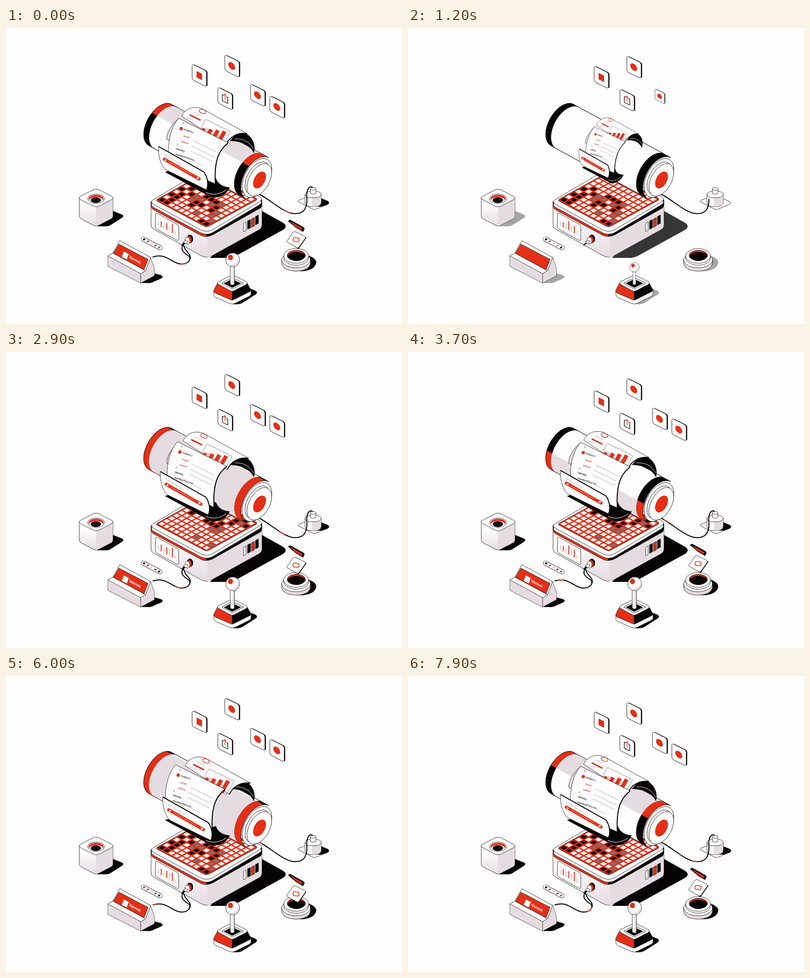
An HTML page for the animation above (8 s loop, 800 by 600 pixels).

```html
<!DOCTYPE html>
<html lang="en">
<head>
<meta charset="utf-8">
<title>Isometric machine</title>
<style>
html, body { margin: 0; width: 100%; height: 100%; overflow: hidden; background: #fffeff; }
svg { display: block; width: 100vw; height: 100vh; }
text { font-family: Inter, Roboto, sans-serif; }
.l { stroke: #151214; stroke-width: .8; stroke-linejoin: round; }
.w { fill: #fffdfe; }
.g { fill: #e5dce1; }
.r { fill: #e42f16; }
.k { fill: #060405; }
.n { fill: none; }
.wire { fill: none; stroke: #060405; stroke-width: 2; stroke-linecap: round; }
.pulse { stroke: #e42f16; }
.rule { stroke: #d9d1d6; stroke-width: 1.8; }
</style>
</head>
<body>
<svg viewBox="0 0 800 600">
<defs>
  <linearGradient id="fade" x2="0" y2="1"><stop offset=".25" stop-color="#fffdfe"/><stop offset="1" stop-color="#e5dce1"/></linearGradient>
  <path id="plate" d="M299 347Q289 352 299 358L393 409Q405 415 417 409L511 353Q521 347 511 341L417 291Q405 285 393 291Z"/>
  <pattern id="dots" width="2.6" height="2.6" patternUnits="userSpaceOnUse"><rect width="2.6" height="2.6" fill="#060405"/><circle cx="1" cy="1" r=".45" fill="#776"/></pattern>
</defs>
<g id="scene">
  <path id="bigShade" class="k" d="M412 466H446Q458 466 466 461L560 409Q570 402 560 395L512 368Z"/>
  <g id="shade" class="k">
    <path d="M183 402H202Q208 402 212 399L234 385Q240 381 234 378L214 370Z"/>
    <path d="M273 517H290Q295 517 299 514L313 508Q320 504 313 501L299 497Z"/>
    <path d="M458 560H468Q473 560 478 557L503 541Q511 536 503 532L490 527Z"/>
    <path d="M586 493H600Q626 490 627 474Q625 466 610 461Z"/>
  </g>

  <!-- machine base -->
  <path class="l" fill="url(#fade)" d="M293 352V400Q293 405 299 408L393 461Q405 468 417 461L511 409Q517 405 517 400V348Z"/>
  <path class="g" d="M407 414V465.500Q412 464 417 460.500L511 408.500Q516.500 405 516.500 400V350Z"/>
  <path class="r l" d="M293 352V361Q293 366 299 369L393 420Q399 423 405 423V412Z"/>
  <path class="k" d="M405 412V423Q411 423 417 420L511 367Q517 364 517 359V348Z"/>
  <use href="#plate" y="6" class="w l"/>
  <use href="#plate" class="w l"/>
  <path class="r l" d="M307 346Q301 349 307 352L399 401Q405 405 411 401L504 350Q510 347 504 344L411 295Q405 291 399 295Z"/>
  <g id="cells" transform="matrix(10 5.4 10 -5.5 305 348.300)"></g>
  <path class="w l" d="M302 378Q302 374 306 376L346 398Q349 400 349 404V428Q349 432 345 430L305 408Q302 406 302 403Z"/>
  <g id="bars"></g>
  <g class="l">
    <path class="w" d="M480 396l5-3v17l-5 3z"/><path class="k" d="M488 391l6-3v17l-6 3z"/>
    <path class="r" d="M496 387l6-3v17l-6 3z"/><path class="k" d="M504 382l6-3v17l-6 3z"/>
  </g>

  <!-- power outlet -->
  <path class="w l" d="M592 349Q588 351 592 353L619 367Q623 369 627 367L650 357Q654 354 650 352L624 340Q620 338 616 340Z"/>
  <path id="plugShade" class="k" d="M622 362H638L650 358Q656 354 649 350L634 344Z"/>
  <path class="w l" d="M604 337V355Q606 361 614 362H626Q636 361 637 353V337Z"/>
  <path class="g" d="M618 340V361.500H626Q636 361 636.500 353V338Z"/>
  <path class="w l" d="M604 337Q606 331 620 330Q636 331 637 337Q636 343 626 344H614Q605 343 604 337Z"/>
  <path class="w l" d="M615 326V335Q620 339 626 335V326"/>
  <ellipse class="w l" cx="620.500" cy="326" rx="5.500" ry="3"/>
  <path class="wire" d="M512 337C535 349 560 374 580 376C600 378 608 368 608 347"/>
  <path id="plugWire" class="wire" pathLength="100" d="M608 347C606 332 611 318 619 323"/>
  <path id="plugPulse" class="wire pulse" pathLength="100" d="M512 337C535 349 560 374 580 376C600 378 608 368 608 347"/>

  <!-- drum -->
  <g id="drum"></g>
  <g class="l" transform="translate(507 304) rotate(28.800)">
    <ellipse class="w" rx="24.800" ry="43"/>
    <ellipse class="w" cx="1" rx="20.500" ry="36"/>
    <ellipse class="w" cx="6" cy="1" rx="20.500" ry="36"/>
    <ellipse class="r" cx="6.500" cy="1" rx="11" ry="18.500" stroke="none"/>
  </g>

  <!-- paper -->
  <g id="paper">
    <path class="k" d="M452 229L470 210L487 215C500 224 505 240 501 254C493 238 476 229 452 229Z"/>
    <path class="n" stroke="#fff" stroke-width=".900" d="M462 225C480 223 494 233 500 245"/>
    <path class="g l" d="M349 183C332 198 324 214 325 226L349 237Z"/>
    <g id="topSheet">
      <path class="w l" d="M355 179C360 165 378 156 397 164L487 214C466 211 451 222 444 237Z"/>
      <path class="n" stroke="#060405" stroke-width="1.800" d="M487 214C466 211 451 222 444 237"/>
      <ellipse class="n" stroke="#e42f16" stroke-width="1.300" cx="397" cy="169" rx="7" ry="4" transform="rotate(20 397 169)"/>
      <path class="n" stroke="#e42f16" stroke-width="3" d="M371 176L393 187"/>
      <path class="n rule" d="M378 170l16 8M365 181l13 6"/>
      <g transform="matrix(.89 .44 -.36 .65 403 185)">
        <rect class="n" width="57" height="42" rx="2" stroke="#555" stroke-width=".7"/>
        <path class="r" d="M3 24h7v19h-7zM16 18h8v25h-8zM29 12h8v31h-8zM42 6h8v37h-8z"/>
        <path fill="#d4cbd0" d="M10 20h6v23h-6zM24 25h5v18h-5zM37 22h5v21h-5z"/>
      </g>
    </g>
    <path class="k" d="M321 292L334 288L402 312L424 304C428 316 438 322 452 323C446 337 434 344 417 344Z"/>
    <path class="n" stroke="#fff" stroke-width="1" d="M404 333C420 341 435 335 445 328"/>
    <g id="front">
      <path class="w l" d="M349 183L449 233C430 247 420 269 423 316L330 275C324 235 333 200 349 183Z"/>
      <path class="n" stroke="#060405" stroke-width="2" d="M449 233C430 247 420 269 423 316"/>
      <circle class="r" cx="354" cy="204" r="3.400"/>
      <g id="words"></g>
      <path class="n rule" d="M379 229l45 22M375 239l46 23M373 249l45 22M371 266l26 13"/>
    </g>
    <g id="flap">
      <path class="w l" d="M308 240L400 292C407 302 410 318 405 328L322 287C312 277 307 258 308 240Z"/>
      <path class="n" stroke="#060405" stroke-width="1.900" d="M308 240L400 292C407 302 410 318 405 328"/>
      <path class="n" stroke="#e42f16" stroke-width="6.500" stroke-linecap="round" d="M320 266L390 306"/>
      <path class="n" stroke="#ff9a89" stroke-width="1" d="M330 272L375 297"/>
      <path class="n" stroke="#fff" stroke-width="3" d="M321 267l3 1.700M385 303l4 2.300"/>
      <path class="n rule" d="M318 255l36 21"/>
    </g>
  </g>

  <!-- knob and sign cable -->
  <ellipse class="k" cx="371.500" cy="427.500" rx="6.500" ry="8.500"/>
  <ellipse class="r" cx="369.500" cy="429.500" rx="5.500" ry="7.500"/>
  <ellipse class="w l" cx="366.500" cy="431" rx="5" ry="7"/>
  <path class="w l" d="M358 434L364 430L368 433L362 438Z"/>
  <path class="wire" d="M360 436L355 440"/>
  <g id="cable">
    <path class="wire" pathLength="100" d="M297 464C322 456 332 474 350 478C368 481 376 468 369 462C358 455 349 448 361 436"/>
    <path class="wire" pathLength="100" d="M372 468C375 456 360 455 358 436"/>
  </g>
  <path id="cablePulse" class="wire pulse" pathLength="100" d="M297 464C322 456 332 474 350 478C368 481 376 468 369 462C358 455 349 448 361 436"/>

  <!-- sign -->
  <path class="w l" d="M230 431L292 465L300 488V502L272 517L206 483V462L216 456Z"/>
  <path class="g" d="M206.500 463L272 498V516.500L206.500 482.500Z"/>
  <path class="g" d="M272 498L282 492L292 466L299.500 488V501.500L272 516.500Z"/>
  <path class="n l" d="M206 462L272 498V517M272 498L282 492L292 465M216 456L282 492"/>
  <path class="r l" d="M228 438L287 469L279 490L217 457Z"/>
  <g id="brand" fill="#fff">
    <path d="M238 453l10 5-4 11-10-5z"/>
    <text transform="matrix(.88 .47 -.3 .95 248 466)" font-size="8" font-weight="700">Vornel.</text>
  </g>

  <!-- indicator strip -->
  <path class="n" stroke="#151214" stroke-width="9.500" stroke-linecap="round" d="M277.500 428L311 445.500"/>
  <path class="n" stroke="#fffdfe" stroke-width="8" stroke-linecap="round" d="M277.500 428L311 445.500"/>
  <g id="leds"></g>

  <!-- speaker -->
  <path class="l" fill="url(#fade)" d="M148 344V381Q148 385 152 387L177 400Q182 403 187 400L212 387Q216 385 216 381V344Z"/>
  <path class="g" d="M182 362V401.500Q185 401 187 399.500L212 386.500Q215.500 385 215.500 381V346Z"/>
  <path class="w l" d="M151 341Q145 344 151 348L176 361Q182 364 188 361L213 348Q219 344 213 341L188 328Q182 325 176 328Z"/>
  <ellipse class="w l" cx="182" cy="346" rx="17" ry="9.500"/>
  <ellipse class="r" cx="182" cy="346" rx="15" ry="8"/>
  <ellipse class="w" cx="182" cy="349" rx="13.500" ry="6.500"/>
  <ellipse fill="url(#dots)" cx="181.500" cy="349" rx="10.500" ry="6"/>

  <!-- puck and cards -->
  <g class="l">
    <path class="g" d="M557 469V478Q560 492 586 493Q612 492 615 478V469Z"/>
    <ellipse class="w" cx="586" cy="470" rx="29" ry="16"/>
    <path class="w" d="M561 462V468Q566 480 586 481Q608 480 611 468V462Z"/>
    <ellipse class="w" cx="586" cy="462" rx="25" ry="15"/>
    <ellipse class="r" cx="586.500" cy="461" rx="18.500" ry="10.500"/>
    <path class="k" d="M568 463Q573 454 587 454Q602 455 605 462Q600 471 587 472Q573 471 568 463Z"/>
  </g>
  <g id="tile">
    <path class="k" d="M570 434L584 414L607 425L591 448Z"/>
    <path class="w l" d="M568 431L580 414Q582 412 585 413L603 422Q606 424 604 427L592 444Q590 447 587 445L569 435Q566 434 568 431Z"/>
    <rect class="n" stroke="#e42f16" stroke-width="1.500" x="-6" y="-4" width="12" height="8" rx="3" transform="translate(586 429) rotate(8)"/>
  </g>
  <g id="lid">
    <path class="k l" d="M570 391L574 389L601 404Q604 406 602 409L600 413L585 404Z"/>
    <path class="r" d="M573 391L599 406L597 410L584 402Z"/>
  </g>

  <!-- joystick -->
  <path class="w l" d="M420 533V541Q420 544 423 546L451 558Q457 561 463 558L491 544Q495 542 495 539V530Z"/>
  <path class="r l" d="M420 535Q419 532 421 529L428 516L457 531V552L452 550L424 538Z"/>
  <path class="k" d="M457 531L487 516L494 529Q496 533 492 535L462 550L457 552Z"/>
  <path class="w l" d="M430 514Q425 517 430 520L452 532Q457 535 462 532L485 520Q490 517 485 514L463 503Q457 500 452 503Z"/>
  <path class="w l" d="M436 517L457 506L480 517L457 529Z"/>
  <path class="k" d="M440 517.500L457 509L475 517.500L457 526.500Z"/>
  <g id="stick">
    <path class="w l" d="M453 480V519Q457 523 461.500 519V480Z"/>
    <path class="g" d="M458 480V520.500Q461 520 461 518V480Z"/>
    <circle class="w l" cx="458" cy="470" r="14"/>
    <path class="g" d="M471 466A14 14 0 0 1 449 480.500Q465 482 471 466Z"/>
    <ellipse class="r" cx="453.500" cy="465" rx="5" ry="5.500"/>
  </g>
  <g id="icons"></g>
</g>
</svg>
<script>
const $ = id => document.getElementById(id);
const LOOP = 8000, CUT = 600, TAU = Math.PI * 2;
const clamp = v => Math.max(0, Math.min(1, v));
const out = v => 1 - (1 - clamp(v)) ** 3;
const set = (el, o) => { for (const k in o) el.setAttribute(k, o[k]); };
const move = (el, x, y) => set(el, { transform: `translate(${x} ${y})` });
const zoom = (el, s, x, y, dy = 0) =>
  set(el, { transform: `translate(${x} ${y + dy}) scale(${s}) translate(${-x} ${-y})` });
function add(parent, tag, attrs) {
  const el = document.createElementNS('http://www.w3.org/2000/svg', tag);
  set(el, attrs);
  return parent.appendChild(el);
}
function track(keys, t) {
  let i = 1;
  while (i < keys.length - 1 && t > keys[i][0]) i++;
  const [a, x] = keys[i - 1], [b, y] = keys[i];
  return x + (y - x) * (t - a) / (b - a);
}

// Cylinder surface between two distances along the axis and two angles.
const AX = .876, AY = .482, TILT = 28.8;
function strip(s0, s1, from, to) {
  const arc = (s, a, b) => Array.from({ length: 25 }, (_, i) => {
    const th = Math.PI * (a + (b - a) * i / 24);
    const c = 47.7 * Math.cos(th), d = s - 27.5 * Math.sin(th);
    return (311.5 + c * AY + d * AX).toFixed(1) + ' ' + (196.5 - c * AX + d * AY).toFixed(1);
  });
  return 'M' + [...arc(s0, from, to), ...arc(s1, to, from)].join('L') + 'Z';
}
const ends = [[0, 12], [12, 209], [209, 224]];
ends.forEach(([a, b], i) =>
  add($('drum'), 'path', { class: i === 1 ? 'w l' : 'k l', d: strip(a, b, 0, 1) }));
const tint = ends.map((_, i) => add($('drum'), 'path', { class: i === 1 ? 'g' : 'r' }));
add($('drum'), 'path', { class: 'n l', d: strip(0, 224, 0, 1) });

function turnDrum(turn) {
  const p = ((turn % 2) + 2) % 2;
  const from = p <= 1 ? 0 : p - 1, to = p <= 1 ? p : 1;
  tint.forEach((el, i) => set(el, { d: strip(...ends[i], from, to) }));
}

const cells = [];
for (let i = 0; i < 10; i++) for (let j = 0; j < 10; j++) {
  const n = Math.sin(i * 127.1 + j * 311.7) * 43758.5;
  cells.push({ j, n: n - Math.floor(n),
    el: add($('cells'), 'rect', { x: i + .14, y: j + .14, width: .72, height: .72 }) });
}
// A band of dark cells sweeps from the front row to the back.
function paintCells(row) {
  for (const c of cells) {
    const v = c.n + Math.abs(c.j - row) / 8;
    set(c.el, { fill: v < .55 ? '#0b0708' : v < .64 || c.n > .96 ? '#777173' : '#fffdfe' });
  }
}

const bars = [8, 12, 10, 16, 12, 17, 7].map((h, i) =>
  ({ h, i, el: add($('bars'), 'path', { stroke: i % 2 ? '#e42f16' : '#d2c9ce', 'stroke-width': 1.9 }) }));
const leds = ['#060405', '#e42f16', '#d2c9ce', '#555', '#060405'].map((fill, i) =>
  add($('leds'), 'ellipse', { cx: 279 + i * 7.6, cy: 428.5 + i * 4.1, rx: 2.3, ry: 1.9, fill }));

[['{', 356, 194], ['Collect {', 359, 207], ['email', 358, 220, 1], ['userid', 353, 231, 1],
 ['}', 345, 237], ['identity', 343, 246], ['memberPersona', 342, 257]].forEach(([s, x, y, red]) => {
  add($('words'), 'text', { transform: `matrix(.9 .3 -.3 .9 ${x} ${y})`, 'font-size': 5.3,
    'font-weight': 600, fill: red ? '#e42f16' : '#171315' }).textContent = s;
});

const icons = [[376, 72.5, 2400, 'box'], [442, 50, 2700, 'dot'], [428, 118.5, 2500, 'share'],
  [494, 110, 2700, 'dot'], [533, 133, 2800, 'dot']].map(([x, y, peak, kind], i) => {
  const el = add($('icons'), 'g', {});
  const card = add(el, 'g', { transform: 'matrix(1 .5 0 1 0 0)' });
  const base = { width: 29, height: 32, rx: 4 };
  add(card, 'rect', { ...base, x: 2, y: -1, class: 'k' });
  add(card, 'rect', { ...base, class: 'w l' });
  if (kind === 'box') add(card, 'rect', { x: 9, y: 10, width: 11, height: 13, class: 'r' });
  if (kind === 'dot') add(card, 'circle', { cx: 14, cy: 16, r: 7, class: 'r' });
  if (kind === 'share') {
    add(card, 'path', { d: 'M12 11H9V23H20V11H17', class: 'n l', style: 'stroke-width:1.3' });
    add(card, 'path', { d: 'M14.5 18V8M12 10l2.500-3 2.500 3', class: 'n', stroke: '#e42f16', 'stroke-width': 1.3 });
  }
  return { el, x, y, peak, delay: 650 + i * 150, amp: i === 1 ? 6.4 : 5.4 };
});

const TURN = [[600, -.35], [1200, 0], [2000, .5], [3700, 1.62], [4800, 2.5], [6000, 3.12], [7900, 4.48], [8600, 5]];
const ROW = [[600, 2], [1300, 2], [2000, 8], [3700, 8], [4800, 5], [6000, 2], [8600, 2]];

function draw(t) {
  const ending = t < CUT, time = ending ? t + 7800 : t;
  const intro = (start, len) => ending ? 1 : out((t - start) / len);
  const shade = (id, start, len) => { $(id).style.opacity = ending ? 1 : clamp((t - start) / len); };
  const sway = 4.5 - 4.5 * Math.cos(TAU * (time - 3800) / 4050);

  $('scene').style.opacity = intro(CUT, 380);
  shade('bigShade', 800, 500);
  shade('shade', 1050, 430);
  shade('plugShade', 1300, 300);

  turnDrum(track(TURN, time));
  paintCells(track(ROW, Math.floor(time / 200) * 200));

  // The paper widens along the drum as it unwraps.
  const grow = intro(950, 900);
  set($('paper'), { transform: `translate(421 232) rotate(${TILT}) scale(${grow} ${.4 + .6 * grow}) rotate(${-TILT}) translate(-421 -232)` });
  $('paper').style.opacity = intro(950, 150);
  const d = sway * (ending ? 1 : clamp((t - 1200) / 1100));
  move($('topSheet'), d * .8, d * .35);
  move($('front'), -d * .7, -d * .35);
  move($('flap'), d, d * .6);

  for (const c of icons) {
    const s = intro(c.delay, 330);
    const y = c.y - c.amp * Math.cos(TAU * (time - c.peak) / 3100);
    set(c.el, { transform: `translate(${c.x + 15 * (1 - s)} ${y + 23 * (1 - s)}) scale(${s})` });
  }

  for (const b of bars) {
    const x = 308 + b.i * 5.6, y = 401 + b.i * 3;
    const h = b.h * (1 + .15 * Math.sin(time / 450 + b.i * 1.7));
    set(b.el, { d: `M${x} ${y}v${-h}` });
  }
  const lit = Math.floor(time / 400) % 5;
  leds.forEach((el, i) => { el.style.opacity = i === lit ? .6 : 1; });

  const wire = intro(1250, 650);
  for (const el of [...$('cable').children, $('plugWire')])
    set(el, { 'stroke-dasharray': `${100 * wire} 200`, visibility: wire ? 'visible' : 'hidden' });
  const run = (time % 1200) / 1200, live = ending || t > 1900;
  for (const id of ['cablePulse', 'plugPulse'])
    set($(id), { 'stroke-dasharray': '9 200', 'stroke-dashoffset': 4 - run * 104, visibility: live ? 'visible' : 'hidden' });

  $('brand').style.opacity = intro(1400, 400);
  const slide = Math.exp(-(((time - 4800) / 180) ** 2));
  move($('brand'), 3 * slide, -2.5 * slide);

  zoom($('stick'), .2 + .8 * intro(950, 900), 457, 520);
  const drop = 13 * (sway / 9) ** 1.6, card = intro(1400, 450);
  zoom($('tile'), card, 586, 430, drop + 30 * (1 - card));
  zoom($('lid'), card, 587, 402, drop + 45 * (1 - card));
}

const start = performance.now();
(function tick() {
  draw((performance.now() - start) % LOOP);
  requestAnimationFrame(tick);
})();
</script>
</body>
</html>
```
